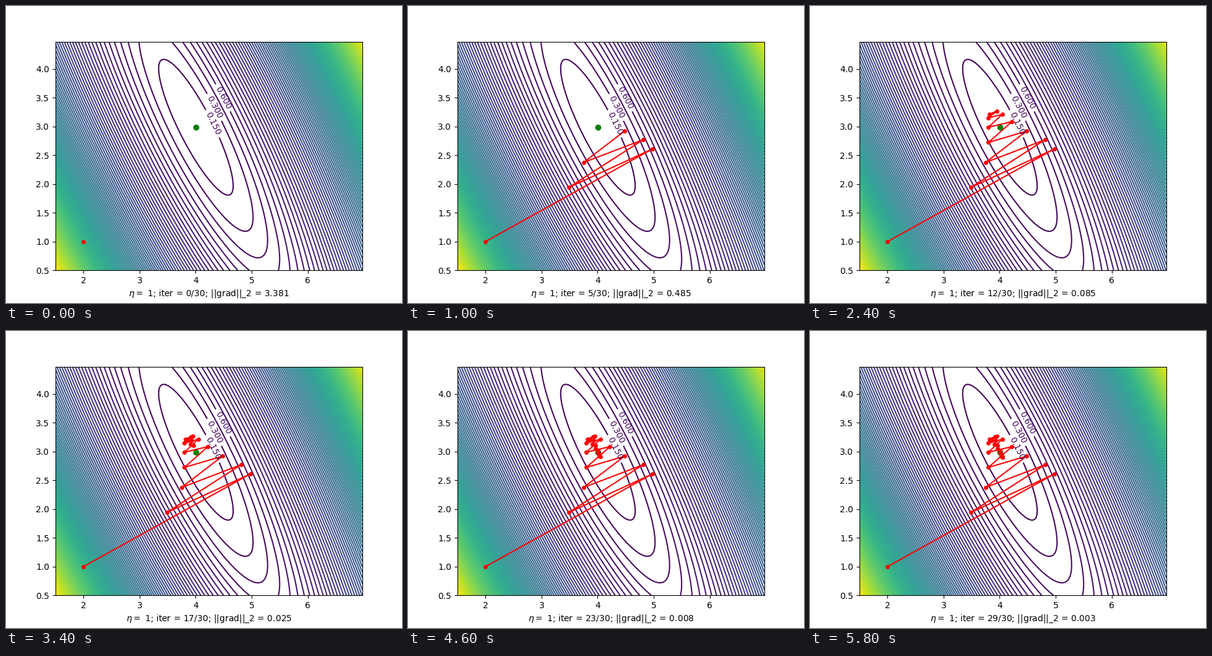
Write a matplotlib script that moves like this. It is 640 px wide and 480 px high and loops after 6000 ms.

```python
import numpy as np
import matplotlib.pyplot as plt
from matplotlib.animation import FuncAnimation

STEPS = 30
ETA = 1
MOMENTUM = 0.9
START = np.array([2.0, 1.0])
BEST = np.array([4.005, 2.987])
HESSIAN = np.array([[1.0, 0.4875], [0.4875, 0.3175]])
NOISE = 0.0388


def grad(p):
    return HESSIAN @ (p - BEST)


def loss(x, y):
    dx, dy = x - BEST[0], y - BEST[1]
    (a, b), (_, c) = HESSIAN
    return a * dx**2 + 2 * b * dx * dy + c * dy**2 + NOISE


def nesterov(p, steps):
    """Points visited by gradient descent with Nesterov momentum."""
    path, v = [p], np.zeros(2)
    for _ in range(steps - 1):
        v = MOMENTUM * v - ETA * grad(p + MOMENTUM * v)
        p = p + v
        path.append(p)
    return np.array(path)


path = nesterov(START, STEPS)
norms = [np.linalg.norm(grad(p)) for p in path]

fig, ax = plt.subplots(figsize=(6.4, 4.8), dpi=100)

xs, ys = np.meshgrid(np.arange(1.5, 7, 0.025), np.arange(0.5, 4.5, 0.025))
rings = ax.contour(xs, ys, loss(xs, ys), 100)
ax.set_xlim(xs.min(), xs.max())
ax.set_ylim(ys.min(), ys.max())
ax.clabel(rings, fmt="%1.3f", fontsize=10,
          manual=[(4.307, 3.05), (4.337, 3.335), (4.49, 3.5)])

ax.plot(*BEST, "go")
trail, = ax.plot([], [], "ro-", markersize=4)


def update(i):
    trail.set_data(path[:i + 1, 0], path[:i + 1, 1])
    ax.set_xlabel(rf"$\eta = $ {ETA}; iter = {i}/{STEPS}; "
                  f"||grad||_2 = {norms[i]:.3f}")
    return trail,


anim = FuncAnimation(fig, update, frames=STEPS, interval=200,
                     repeat=True, repeat_delay=0)
plt.show()
```
